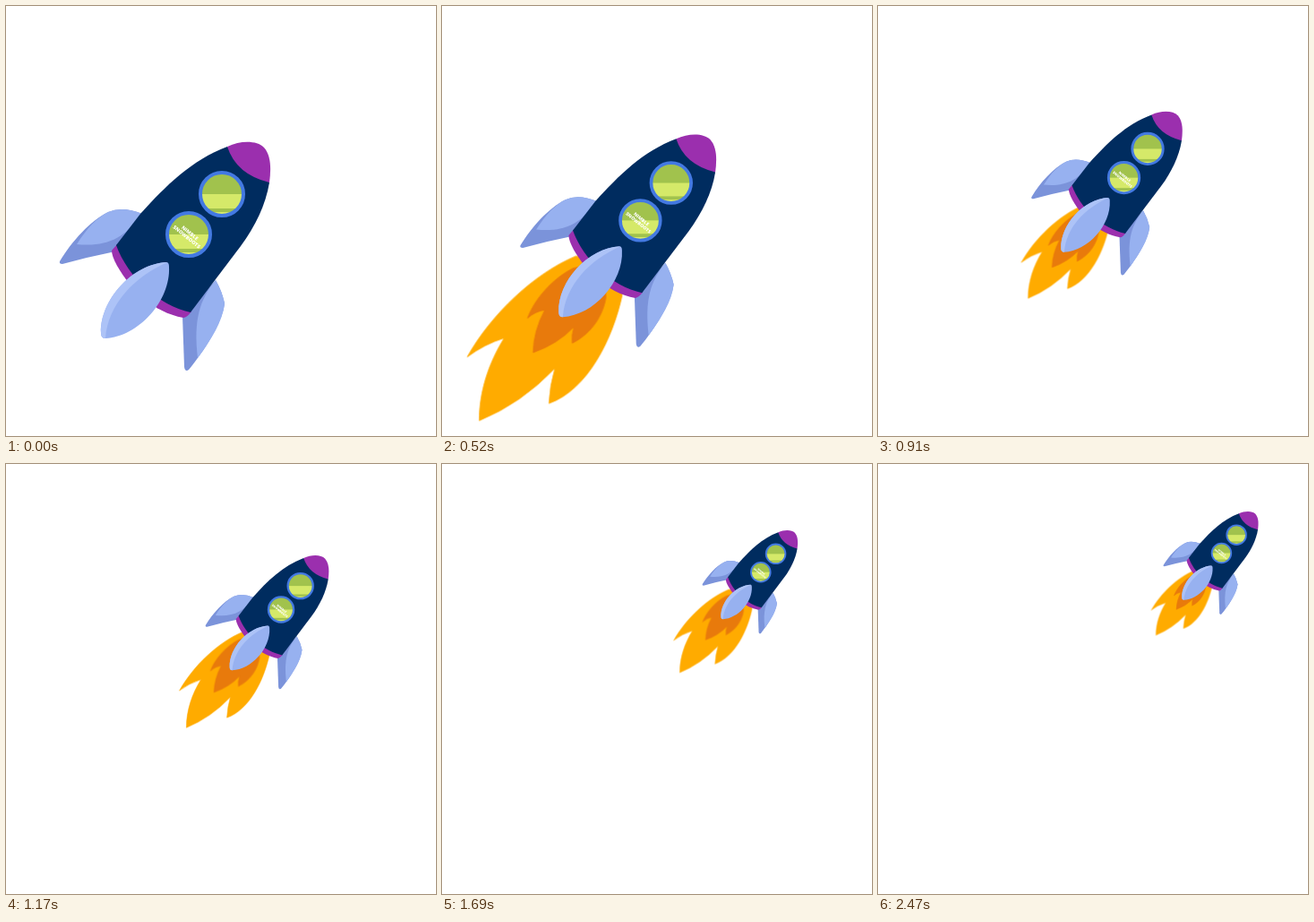
Write an HTML page that moves like this. It is 480 px wide and 480 px high and loops after 2.73 s.

```html
<!DOCTYPE html>
<html lang="en">
<head>
<meta charset="utf-8">
<title>Rocket</title>
<style>
html, body { margin: 0; width: 100%; height: 100%; overflow: hidden; background: #fff; }
svg { display: block; width: 100vw; height: 100vh; }
#rocket { transform-origin: 177.5px 279.5px; }
.flame { transform-origin: 175px 300px; stroke-width: 1; stroke-linejoin: round; }
#outer { fill: #ffab00; stroke: #ffab00; }
#inner { fill: #e87a0c; stroke: #e87a0c; }
.body { fill: #002c5f; }
.trim { fill: #9b2fae; }
.fin { fill: #97b1f0; }
.shade { fill: #7b93da; }
.glow { fill: #adc3f7; }
.glass { fill: #a1c24d; }
.ring { fill: none; stroke: #4379e2; stroke-width: 4; }
.shine { fill: #d5e969; }
text { font: 800 5.6px "Open Sans", "Noto Sans", sans-serif; fill: #fff; text-anchor: middle; }
</style>
</head>
<body>
<svg viewBox="0 0 480 480">
  <defs>
    <clipPath id="pane"><circle r="23"/></clipPath>
    <g id="bands" class="shine">
      <rect x="-32" y="0" width="64" height="16"/>
      <rect x="-32" y="20" width="64" height="4"/>
    </g>
    <g id="window">
      <circle class="glass" r="24"/>
      <g clip-path="url(#pane)"><use class="sweep" href="#bands"/></g>
      <circle class="ring" r="24"/>
    </g>
  </defs>
  <g id="drift">
  <g id="rocket">
    <path id="outer" class="flame" d="M175 300L128 298C80 318 30 365 2 415Q22 400 45 393C27 422 16 455 16 489Q65 469 104 428Q98 448 97 469C142 453 171 394 182 343Z"/>
    <path id="inner" class="flame" d="M160 304L125 312C101 324 80 348 72 370Q81 362 92 360.500Q79 385 78.500 410Q107 400 126 380Q123 389 124 399C148 387 160 365 163 346Z"/>

    <path class="shade" d="M60 285C74 262 94 240 114 230Q130 223 152 232L122 274Q92 280 63 288Q59 288 60 285Z"/>
    <path class="fin" d="M79 266C90 248 102 236 114 230Q130 223 152 232C132 260 112 269 79 266Z"/>
    <path class="shade" d="M234 306L197 346L199 403Q200 409 204 406C221 385 241 355 244 332Q241 318 234 306Z"/>
    <path class="fin" d="M234 306C216 328 209 351 214 393C229 372 242 352 244 332Q241 318 234 306Z"/>

    <path class="trim" d="M124 266L118 273Q118 279 124 290C139 316 164 342 198 348Q202 348 207 341Z"/>
    <path class="body" d="M247 157C207 172 178 201 150 232L123 267C136 303 170 334 206 342L262 268C278 246 290 222 294 197Z"/>
    <path class="trim" d="M247 157C262 150 280 150 288 158C296 167 296 182 294 197Q257 188 247 157Z"/>

    <use href="#window" x="241" y="210"/>
    <use href="#window" x="204" y="255"/>
    <g transform="translate(203.500 255.500) rotate(39)">
      <text y="-.8">NIMBLE</text>
      <text y="4.800">SNOWBOOTS</text>
    </g>

    <path class="fin" d="M179 286Q182 286 182 291C184 329 148 369 111 371Q106 371 106 365C105 328 141 288 179 286Z"/>
    <path class="glow" d="M180 286C144 302 114 332 111 371Q106 371 106 365C105 328 141 288 180 286Z"/>
  </g>
  </g>
</svg>
<script>
const STEP = 130, LOOP = 2730, LAST = LOOP - 2 * STEP;
const QUAD_OUT = "cubic-bezier(.333, .667, .667, 1)";
const SINE = "cubic-bezier(.364, 0, .636, 1)";
const clips = [];

// Every animation stays paused; the clock below sets its time.
function move(selector, frames, from, to, options) {
  for (const el of document.querySelectorAll(selector)) {
    const clip = el.animate(frames, { delay: from, duration: to - from, fill: "both", ...options });
    clip.pause();
    clips.push(clip);
  }
}

function flicker(selector, peak, dip, surge, end) {
  const from = 80;
  const key = (time, size, easing = "linear") =>
    ({ offset: (time - from) / (LAST - from), transform: `scale(${size})`, easing });
  move(selector, [
    key(from, 0, QUAD_OUT), key(560, peak, SINE), key(910, dip, SINE),
    key(1430, surge), key(LAST, end)
  ], from, LAST);
}

// Flying away: shrink along the path, then a slow steady drift.
move("#rocket", { transform: ["translate(0px, 0px) scale(1)", "translate(151px, -136px) scale(.451)"] },
  260, 1760, { easing: "cubic-bezier(.243, 0, .55, 1)" });
move("#drift", { transform: ["translate(0px, 0px)", "translate(43px, -33px)"] }, 1235, LAST);

flicker("#outer", 1.04, .757, 1.15, .838);
flicker("#inner", 1.04, .86, 1.19, .86);

// Two glints pass upwards over the windows.
move(".sweep", { transform: ["rotate(13deg) translateY(30px)", "rotate(13deg) translateY(-142px)"] },
  573, 1272, { iterations: 2 });

const start = performance.now();
function tick() {
  const t = (performance.now() - start) % LOOP;
  const time = Math.min(Math.floor(t / STEP) * STEP, LAST);
  for (const clip of clips) clip.currentTime = time;
  requestAnimationFrame(tick);
}
tick();
</script>
</body>
</html>
```
